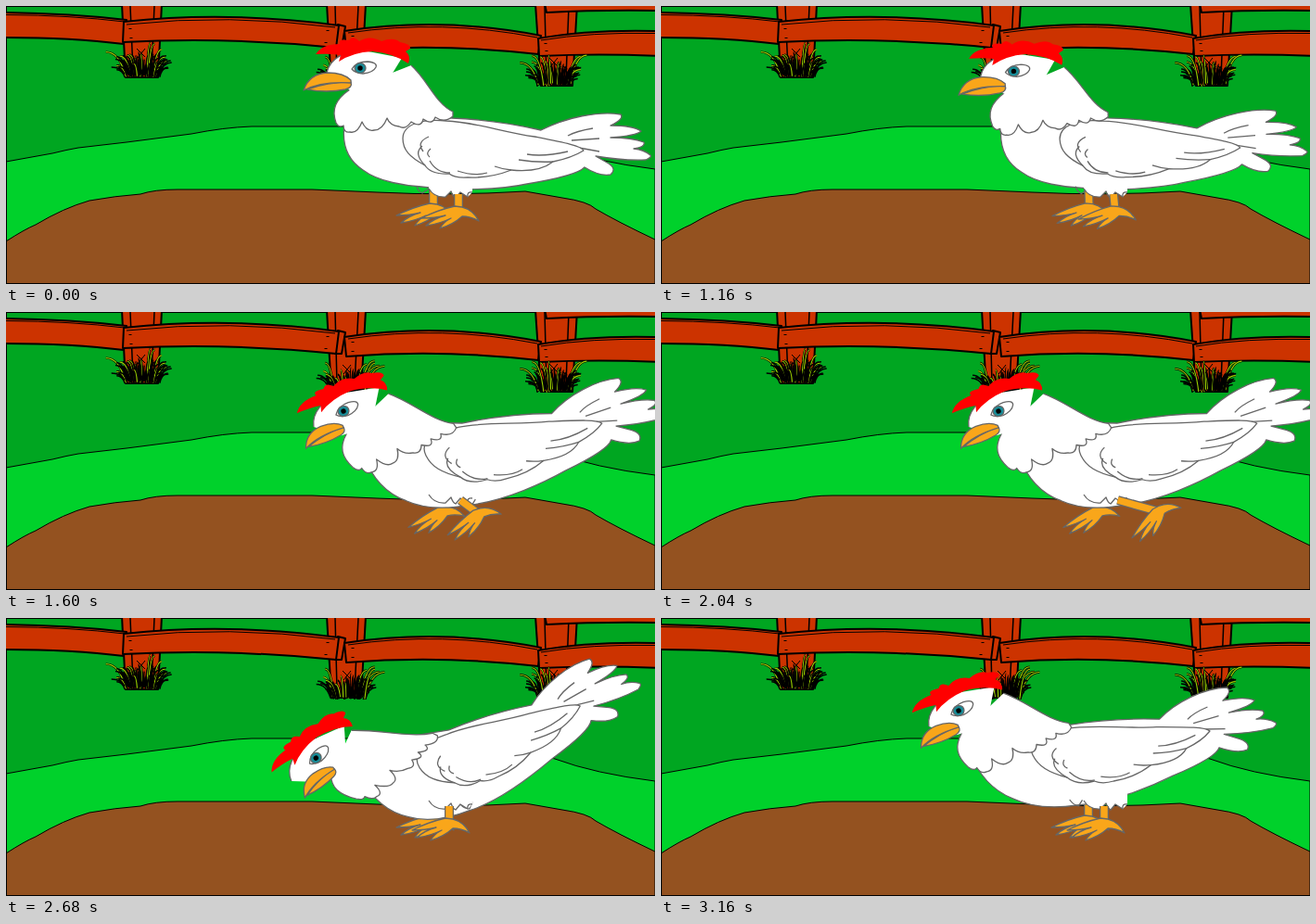
An HTML page for the animation above (3.2 s loop, 700x300 px).

```html
<!DOCTYPE html>
<html lang="en">
<head>
<meta charset="utf-8">
<title>Hen in the yard</title>
<style>
html, body { margin: 0; width: 100%; height: 100%; overflow: hidden; background: #00a621; }
svg { display: block; width: 700px; height: 300px; }
.wood { fill: #cc3300; stroke: #000; stroke-width: 2; stroke-linejoin: round; }
.land { stroke: #000; stroke-width: 1; }
.hen path, .hen ellipse { stroke: #666; stroke-width: 1.3; stroke-linejoin: round; vector-effect: non-scaling-stroke; }
.hen .plain { stroke: none; }
.white { fill: #fff; }
.line { fill: none; }
.horn { fill: #f9a61a; }
</style>
</head>
<body>
<svg viewBox="0 0 700 300">
  <rect width="700" height="300" fill="#00a621"/>
  <path class="land" fill="#00d12b" d="M0 168L50 159Q66 155 78 153L130 147L200 138Q235 131 265 130H450Q545 138 592 152Q635 168 700 176V301H0Z"/>
  <path class="land" fill="#945220" d="M0 254Q20 241 32 236Q62 218 90 210Q118 205 145 203Q160 198 185 198H330L400 201Q480 205 560 200L600 207Q628 211 636 219Q660 233 700 252V299.500H0Z"/>
  <path d="M.5 0V300M0 .5H700" stroke="#000"/>
  <g class="wood">
    <path d="M125 -2L129 77H164L168 -2ZM346 -2L351 86H383L388 -2ZM571 -2L577 86H611L616 -2Z"/>
    <path d="M134 0L137 70M160 0L157 70M355 0L357 78M380 0L376 78M581 0L583 78M607 0L604 78" fill="none" stroke-width="1.500"/>
    <path d="M-3 7Q70 8 130 15L127 41Q70 34 -3 34Z"/>
    <path d="M358 20L366 22L362 45L355 45Z"/>
    <path d="M127 17Q240 5 359 21L356 45Q240 33 126 39Z"/>
    <path d="M365 27Q470 11 577 32L574 52Q470 40 367 48Z"/>
    <path d="M574 35Q630 25 703 27V54Q640 51 575 54Z"/>
    <path d="M581 -3L583 7Q640 4 703 5V-3Z"/>
    <path d="M0 9.500Q70 10 128 17M130 20Q240 8 355 23M369 29Q470 14 573 34M577 37Q630 28 700 29.500" fill="none" stroke-width="1"/>
    <path d="M134 24v1M135 34v1M347 26v1M345 39v1M374 32v1M374 42v1M582 40v1M583 48v1" stroke-width="3"/>
  </g>
  <g id="grass" fill="none"></g>

  <g class="hen">
    <path id="legL" class="line"/><path id="innerL" class="line"/>
    <path id="footL" class="horn"/>
    <g id="trunk">
      <path id="torso" class="white"/>
      <path class="line" d="M633 132Q615 135 606 140M640 143L610 145M640 157L618 153M443 194Q444 200 449 202L456 197"/>
      <path class="white" d="M428 143C428 128 448 121 475 124C505 125 535 136 570 141C600 147 621 151 623 156Q610 164 590 168Q575 180 545 177Q522 186 498 185Q485 186 478 181Q458 182 452 172C435 163 428 155 428 143Z"/>
      <path class="line" d="M456 141Q442 147 450 157M449 151Q439 159 452 172M458 154Q452 159 457 163M457 167Q464 180 479 180M487 178Q505 184 519 180M606 157Q580 163 562 160M590 168Q572 169 553 166M545 177Q535 176 527 173"/>
    </g>
    <g id="bib">
      <path class="white" d="M437 64C455 80 463 105 482 114L482 119Q473 127 463 120Q460 129 450 122Q448 132 437 125Q431 134 424 130Q414 129 411 121Q406 134 397 134Q389 136 384 125Q379 138 371 136Q364 137 364 129Q359 132 356 126C351 112 355 101 371 90"/>
    </g>
    <g id="head">
      <path class="white plain" d="M346 72C349 57 365 48 385 48L427 56L405 92L371 91Z"/>
      <path class="line" d="M346 72C349 57 365 48 385 48"/>
      <path fill="#f00" class="plain" d="M334 52Q341 41 360 41Q357 35 370 37Q374 31 381 38Q392 31 405 38Q418 33 425 39Q437 41 436 46L431 49Q437 54 434 62Q418 51 395 49Q374 50 359 60L361 53Q349 51 334 52Z"/>
      <path class="white" d="M373 68Q378 60 390 60Q401 61 399 66Q396 72 385 73Q376 72 373 68Z"/>
      <ellipse cx="382" cy="67" rx="6" ry="5.500" fill="#168c98"/>
      <circle cx="382" cy="67" r="2.700"/>
      <g id="beak">
        <path d="M370 82L345 83L343 88L360 89Z"/>
        <path id="jaw" class="horn" d="M372 82Q374 88 366 90Q346 94 325 90Q346 82 372 82Z"/>
        <path class="horn" d="M321 91Q327 73 347 72Q364 72 372 80V83Q340 81 321 91Z"/>
      </g>
    </g>
    <path class="white plain" d="M456 190V197Q462 207 474 206L480 200L485 207L490 201L498 206L503 201V188Z"/>
    <path class="line" d="M456 197Q462 207 474 206L480 200Q482 206 485 207L490 201L498 206Q497 200 503 201"/>
    <path id="legR" class="line"/><path id="innerR" class="line"/>
    <path id="footR" class="horn"/>
  </g>
</svg>
<script>
const el = id => document.getElementById(id);
const set = (id, name, value) => el(id).setAttribute(name, value);

// Grass: fans of fine black blades, some bright ones arching outwards
let seed = 7;
const rnd = () => (seed = seed * 16807 % 2147483647) / 2147483647;
let blades = '';
const blade = (x, y, reach, h, color, width) => {
  blades += `<path d="M${x} ${y}q${reach * .3} ${-h} ${reach} ${-h}" stroke="${color}" stroke-width="${width}"/>`;
};
for (const [cx, cy] of [[147, 77], [369, 88], [592, 87]]) {
  for (let i = 0; i < 100; i++) {
    const side = rnd() * 2 - 1, x = cx + side * 19, y = cy - rnd() * 4;
    blade(x, y, side * (4 + rnd() * 12), 7 + rnd() * (20 - 8 * Math.abs(side)), '#000', 1.5);
    if (i % 7 === 0) {
      const reach = side * (10 + rnd() * 14), h = 12 + rnd() * 22;
      blade(x, y, reach, h, '#000', 2.4);
      blade(x, y, reach, h, '#9fd600', 1.1);
    }
  }
  blades += `<path d="M${cx - 6} ${cy - 31}l9 9M${cx + 3} ${cy - 31}l-8 10" stroke="#000"/>`;
}
el('grass').innerHTML = blades;

const FOOT = 'M-4 -6Q-22 -2 -40 7Q-25 7 -14 4Q-26 7 -35 15Q-20 13 -8 7Q-16 11 -20 18Q-6 14 4 5Q13 5 22 10Q16 -2 4 -5Z';
for (const s of 'LR') {
  set('foot' + s, 'd', FOOT);
  el('leg' + s).style.strokeWidth = 10;
  el('inner' + s).style.cssText = 'stroke:#f9a61a;stroke-width:7.5';
}

// Each pose: trunk matrix, bib matrix (ending at the eye), [head turn, beak shift, beak scale, belly sag]
const STAND = [[1, 0, 0, 1, 428, 143], [1, 0, 0, 1, 382, 67], [0, 0, 1, 0]];
const BOW = [[.94, -.245, .5, 1, 453, 155], [.913, -.293, .583, .907, 364, 107], [-20, 4, .9, 6]];
const DEEP = [[.83, -.43, .63, .87, 445, 163], [.726, -.553, 1.155, .452, 329, 159], [-38, 22, .85, 9]];
const RISE = [[.946, -.2, .5, 1, 401, 148], [.913, -.293, .583, .907, 321, 100], [-20, 4, .9, 6]];
// Legs: left x y turn, right x y turn, left hip x, right hip x
const FEET = [461, 219, 0, 488, 222, 0, 461, 488];
const CLOSE = [461, 219, 0, 478, 222, 0, 461, 478];
const STEP = [471, 216, -14, 510, 218, -24, 463, 490];
const KICK = [471, 216, -14, 552, 214, -40, 463, 494];

const part = (t, from, to) => Math.min(1, Math.max(0, (t - from) / (to - from)));
const mix = (a, b, p) => Array.isArray(a) ? a.map((v, i) => mix(v, b[i], p)) : a + (b - a) * p;

function leg(side, x, y, turn, hipX, hipY) {
  const d = `M${hipX} ${hipY}L${x} ${y}`;
  set('leg' + side, 'd', d);
  set('inner' + side, 'd', d);
  set('foot' + side, 'transform', `translate(${x} ${y}) rotate(${turn})`);
}

function drawBody([trunk, bib, [turn, shift, size, sag]]) {
  set('trunk', 'transform', `matrix(${trunk}) translate(-428 -143)`);
  set('bib', 'transform', `matrix(${bib}) translate(-382 -67)`);
  set('head', 'transform', `translate(${bib[4]} ${bib[5]}) rotate(${turn}) translate(-382 -67)`);
  set('beak', 'transform', `translate(${372 + shift} ${80 + shift * .3}) scale(${size}) translate(-372 -80)`);
  set('torso', 'd', `M365 128C362 150 368 ${166 + sag * .5} 385 ${177 + sag * .7}
    C402 ${190 + sag} 432 ${194 + sag} 448 ${195 + sag}C485 ${200 + sag} 535 198 562 192C592 187 618 181 624 174
    Q640 184 652 182Q659 176 650 170L636 162Q665 167 690 166Q697 163 695 161Q688 155 677 154
    Q690 152 688 147Q675 142 652 142Q680 140 685 135Q676 129 652 129Q667 122 663 117
    C640 113 604 120 577 134Q530 123 481 121L440 110L380 120Z`);
}

function draw(t) {
  let pose, feet;
  if (t < 1680) {
    const p = part(t, 1120, 1600);
    pose = mix(STAND, BOW, p);
    feet = mix(FEET, STEP, p);
  } else if (t < 2280) {
    pose = BOW;
    feet = mix(STEP, KICK, part(t, 1680, 2240));
  } else {
    pose = t < 2840 ? mix(BOW, DEEP, part(t, 2240, 2760)) : mix(BOW, RISE, part(t, 2840, 3160));
    feet = CLOSE;
  }
  drawBody(pose);
  const open = part(t, 0, 520) - part(t, 580, 1120);
  set('jaw', 'transform', `rotate(${-16 * open} 372 82)`);
  leg('L', feet[0], feet[1], feet[2], feet[6], 195);
  leg('R', feet[3], feet[4], feet[5], feet[7], 203);
}

const start = performance.now();
(function tick() {
  draw((performance.now() - start) % 3200);
  requestAnimationFrame(tick);
})();
</script>
</body>
</html>
```
